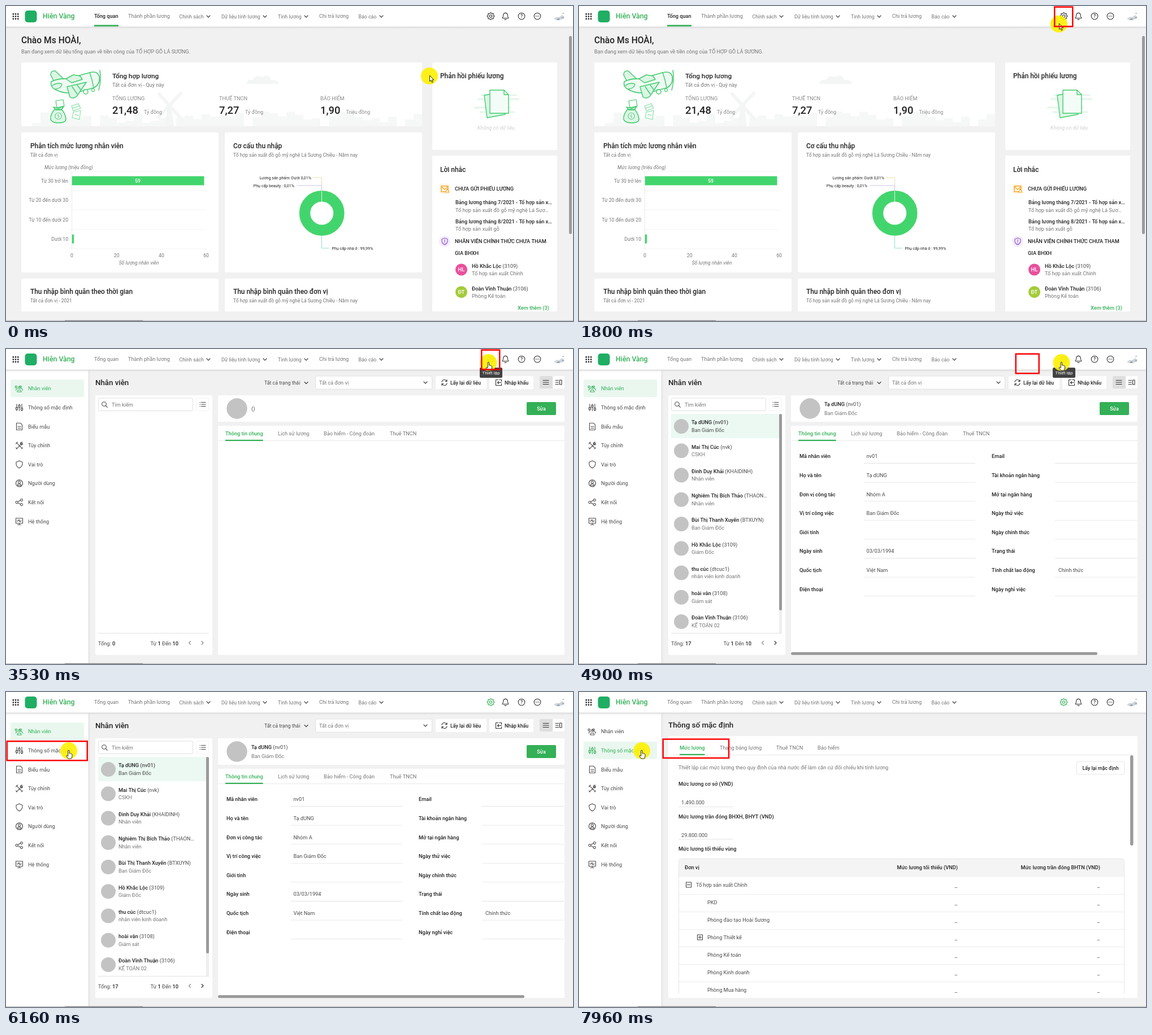
Animation, 1003 px wide and 558 px high, one loop 8000 ms. Source, as an HTML page with a canvas:

```html
<!DOCTYPE html>
<html lang="vi">
<head>
<meta charset="utf-8">
<style>
html, body { margin: 0; width: 100%; height: 100%; overflow: hidden; background: #f1f1f1; }
canvas { display: block; width: 1003px; height: 558px; }
</style>
</head>
<body>
<canvas id="stage"></canvas>
<script>
const W = 1003, H = 558, LOOP = 8000;
const canvas = document.getElementById('stage');
const dpr = window.devicePixelRatio || 1;
canvas.width = W * dpr;
canvas.height = H * dpr;
const c = canvas.getContext('2d');

const INK = '#212121', SOFT = '#4a4a4a', MUTE = '#757575', GREEN = '#34b057', LINE = '#e3e3e8', GREY = '#c3c3c3', THUMB = '#9b9b9b';
const COMPANY = 'Tổ hợp sản xuất đồ gỗ mỹ nghệ Lá Sương Chiều';

// ---- helpers ----
const clamp = v => Math.min(1, Math.max(0, v));
const prog = (t, from, to) => clamp((t - from) / (to - from));
const sine = p => (1 - Math.cos(Math.PI * p)) / 2;
const mix = (a, b, p) => a + (b - a) * p;

// Text centred vertically on y; returns the x where it ends.
function text(s, x, y, size = 9.2, color = SOFT, weight = 400, align = 'left') {
  c.font = `${weight} ${size}px Roboto, sans-serif`;
  c.fillStyle = color;
  c.textAlign = align;
  c.fillText(s, x, y + size * 0.36);
  return x + c.measureText(s).width;
}
const bold = (s, x, y, size = 9.2, color = INK, align) => text(s, x, y, size, color, 500, align);

function box(x, y, w, h, fill, r = 0, border) {
  c.beginPath();
  c.roundRect(x, y, w, h, r);
  if (fill) { c.fillStyle = fill; c.fill(); }
  if (border) { c.strokeStyle = border; c.lineWidth = 0.8; c.stroke(); }
}
const card = (x, y, w, h) => box(x, y, w, h, '#fff', 2);

function disc(x, y, r, fill, stroke, lw = 1.1) {
  c.beginPath();
  c.arc(x, y, r, 0, 7);
  if (fill) { c.fillStyle = fill; c.fill(); }
  if (stroke) { c.strokeStyle = stroke; c.lineWidth = lw; c.stroke(); }
}

function path(d, x, y, stroke, lw = 1.1, fill) {
  const p = new Path2D(d);
  c.save();
  c.translate(x, y);
  c.lineJoin = c.lineCap = 'round';
  if (fill) { c.fillStyle = fill; c.fill(p); }
  if (stroke) { c.strokeStyle = stroke; c.lineWidth = lw; c.stroke(p); }
  c.restore();
}
const hline = (x1, x2, y, color = LINE, h = 0.8) => box(x1, y - h / 2, x2 - x1, h, color);
const chevron = (x, y, color = '#444') => path('M-3-1.5L0 1.5 3-1.5', x, y, color, 1.2);

function clipped(x, y, w, h, draw) {
  c.save();
  c.beginPath();
  c.rect(x, y, w, h);
  c.clip();
  draw();
  c.restore();
}

function gear(x, y, color) {
  c.beginPath();
  for (let i = 0; i < 32; i++) {
    const a = (i - 0.5) / 32 * Math.PI * 2, r = i % 4 < 2 ? 6.3 : 4.9;
    c.lineTo(x + r * Math.cos(a), y + r * Math.sin(a));
  }
  c.closePath();
  c.strokeStyle = color;
  c.lineWidth = 1.1;
  c.stroke();
  disc(x, y, 2.2, null, color);
}

// ---- shared chrome ----
function header(home, gearColor) {
  const shade = c.createLinearGradient(0, 36, 0, 41);
  shade.addColorStop(0, '#d2d2d2');
  shade.addColorStop(1, 'rgba(225,225,225,0)');
  c.fillStyle = shade;
  c.fillRect(0, 36, W, 5);
  box(0, 0, W, 36.5, '#fff');
  for (let i = 0; i < 9; i++) box(11.6 + i % 3 * 4.2, 13 + (i / 3 | 0) * 4.2, 2.5, 2.5, '#222', 0.6);
  box(33.5, 8, 21, 21, '#1fae63', 5);
  bold('Hiên Vàng', 65, 18, 12.3, GREEN);
  if (home) {
    bold('Tổng quan', 156, 18, 9.1);
    box(156, 33.6, 43, 2.6, GREEN);
  } else text('Tổng quan', 156, 18, 9.2, MUTE);
  text('Thành phần lương', 216, 18, 9.2, MUTE);
  text('Chi trả lương', 554, 18, 9.2, MUTE);
  [['Chính sách', 306.5, 358], ['Dữ liệu tính lương', 381, 458], ['Tính lương', 481, 531], ['Báo cáo', 623.5, 664]]
    .forEach(([s, x, cx]) => { text(s, x, 19, 8.8, MUTE); chevron(cx, 18.5); });
  gear(857.5, 18, gearColor);
  path('M-5.5 3.5Q-3.8 1.5-3.8-1.5C-3.8-7 3.8-7 3.8-1.5Q3.8 1.5 5.5 3.5ZM-1.5 5.5Q0 7 1.5 5.5', 883.5, 18, '#333');
  disc(912, 18, 5.8, null, '#333');
  bold('?', 912, 18.2, 8.5, '#333', 'center');
  disc(940, 18, 5.8, null, '#333');
  for (const dx of [-2.6, 0, 2.6]) disc(940 + dx, 18, 0.8, '#333');
  path('M-9 3Q-5-2 0 0L6-4 10 0 5 4-2 5Z', 978, 20, null, 0, '#cfd6db');
  path('M-5 4L0 0 2 4ZM5-1L9-2 8 2Z', 978, 21, null, 0, '#9aa7b1');
  disc(985.5, 13, 1, '#8b97a0');
}

function footerLine() {
  hline(0, W, 557.4, '#c4c4c4', 1.2);
  hline(104, 242, 557.4, '#858585', 1.2);
}

// ---- dashboard ----
function skyline() {
  c.fillStyle = '#f5f8f6';
  for (let i = 0; i < 46; i++) {
    const n = Math.abs(Math.sin(i * 12.9898) * 43758.5453) % 1;
    if (i % 9 === 7) continue;
    c.fillRect(46 + i * 15, 213 - 6 - n * 20, 15, 6 + n * 20);
  }
  path('M-3 0H3L8 37H-8Z', 289, 176, null, 0, '#f3f6f4');
  path('M-18-20L22 25M20-21L-20 21', 289, 176, '#f3f6f4', 6);
  path('M0 14Q2 5 12 7 18-4 28 2 40-6 44 7 56 6 58 14Z', 425, 124, null, 0, '#f3f6f4');
}

function plane() {
  const g = '#43cc70', pale = '#dcf6e5';
  path('M84 132L79 122Q79 114 87 115L103 130Z', 0, 0, g, 1.5, pale);
  path('M80 134Q92 128 108 129L148 118Q162 114 165 125 167 139 155 145L126 153Q100 157 84 146 78 141 80 134Z', 0, 0, g, 1.6, '#eefaf2');
  path('M106 129L119 122 131 124 135 130 116 136ZM148 118Q153 131 155 145M108 143L142 135 126 159Q119 166 113 161Z', 0, 0, g, 1.5, pale);
  path('M82 141Q90 135 99 138 98 146 88 147', 0, 0, g, 1.3, pale);
  path('M166 114Q169 130 164 149M117 143L126 156M126 140L132 148M138 148L141 152', 0, 0, g, 1.5);
  disc(141, 152, 4, '#fff', g, 1.5);
  disc(154, 149, 2.5, '#fff', g, 1.2);
  path('M88 168L101 166 103 177 90 180Z', 0, 0, g, 1.2, '#fff');
  path('M86 183Q78 192 79 201 81 207 93 207 106 207 106 200 105 190 98 183ZM84 179L88 184 98 184 102 178 93 181Z', 0, 0, g, 1.6, pale);
  disc(92.5, 195, 5.5, '#fff', g, 1.2);
  bold('$', 92.5, 195, 8, g, 'center');
  path('M116 177L128 173 132 181 119 186ZM118 181L130 177M119 188L132 185 130 201 117 198ZM122 192L128 194', 0, 0, '#86dfa4', 1.1, '#f6fcf8');
}

function barChart() {
  bold('Phân tích mức lương nhân viên', 43, 247.5, 11.9);
  text('Tất cả đơn vị', 43, 263.5, 8.5, MUTE);
  text('Mức lương (triệu đồng)', 68, 286, 8.6, MUTE, 'italic 400');
  for (const y of [293, 327, 361, 396, 430]) hline(112, 354, y, '#f3f3f3');
  box(116, 293, 0.8, 137, '#e6e6e6');
  ['Từ 30 trở lên', 'Từ 20 đến dưới 30', 'Từ 10 đến dưới 20', 'Dưới 10']
    .forEach((s, i) => text(s, 110, 310 + i * 34.4, 8.6, MUTE, 400, 'right'));
  box(116.7, 301.6, 233.8, 15.8, '#43d56d');
  box(116.7, 404.8, 3.5, 15.8, '#43d56d');
  bold('59', 233, 310, 8.5, '#fff', 'center');
  [0, 20, 40, 60].forEach((n, i) => text(n, 116.5 + i * 79.2, 441.5, 8.6, MUTE, 400, 'center'));
  text('Số lượng nhân viên', 235, 455, 8.6, MUTE, 'italic 400', 'center');
}

function donut() {
  bold('Cơ cấu thu nhập', 402, 247.5, 11.9);
  text(COMPANY + ' - Năm nay', 402, 263.5, 8.5, MUTE);
  disc(558.7, 367, 30.2, null, '#43d56d', 19.4);
  box(558, 327, 1, 20, '#dff5e6');
  path('M558.5 327V304H543', 0, 0, '#ecd9a0', 0.9);
  path('M558.5 327V318H515', 0, 0, '#c6bbe8', 0.9);
  path('M558.5 407V429H571', 0, 0, '#84dcc4', 0.9);
  text('Lương sản phẩm: Dưới 0,01%', 540, 304, 7.1, INK, 400, 'right');
  text('Phụ cấp beauty : 0,01%', 510, 318, 7.1, INK, 400, 'right');
  text('Phụ cấp nhà ở : 99,99%', 576.5, 429, 7.1, INK);
}

function reminders() {
  bold('Lời nhắc', 768, 289.5, 11.9);
  box(767, 315, 18, 18, '#fff6e8', 4);
  path('M-6-5H6V5H-6ZM-6-4L0 1 6-4', 776, 324, '#f5a623', 1.4);
  path('M1 6L4.5 0 8 6Z', 776, 324, '#f5a623', 1.2, '#fff6e8');
  bold('CHƯA GỬI PHIẾU LƯƠNG', 794, 324);
  [7, 8].forEach((m, i) => bold(`Bảng lương tháng ${m}/2021 - Tổ hợp sản x…`, 795, 348 + i * 33.5));
  text('Tổ hợp sản xuất đồ gỗ mỹ nghệ Lá Sươ…', 795, 361.5, 9.2, MUTE);
  text('Tổ hợp sản xuất gỗ', 795, 395, 9.2, MUTE);
  disc(776, 417, 10, '#f3edfb');
  path('M0-6L5-4V0Q4 4 0 6-4 4-5 0V-4ZM0-3V1M0 3V3.2', 776, 417, '#9357d6', 1.2);
  bold('NHÂN VIÊN CHÍNH THỨC CHƯA THAM', 794, 417);
  bold('GIA BHXH', 794, 437.5);
  [['HL', 'Hồ Khắc Lộc', '3109', 'Tổ hợp sản xuất Chính', '#e9509d'], ['ĐT', 'Đoàn Vĩnh Thuận', '3106', 'Phòng Kế toán', '#a4cb3a']]
    .forEach(([tag, name, id, dept, color], i) => {
      const y = i * 39.7;
      disc(805.5, 467 + y, 10.5, color);
      bold(tag, 805.5, 467 + y, 9.6, '#fff', 'center');
      text(` (${id})`, bold(name, 824, 460.5 + y), 460.5 + y);
      text(dept, 824, 474 + y, 9.2, MUTE);
    });
  bold('Xem thêm (3)', 905, 535, 9.2, GREEN);
}

function dashboard() {
  bold('Chào Ms HOÀI,', 27, 60.5, 15.6);
  text('Bạn đang xem dữ liệu tổng quan về tiền công của TỔ HỢP GỖ LÁ SƯƠNG.', 27, 80.5, 9.2, MUTE);
  card(27, 100, 709, 113);
  for (const x of [27, 387]) {
    card(x, 224, 349, 248);
    card(x, 483, 349, 58);
  }
  card(754, 100, 221, 155);
  card(754, 265, 221, 276);
  box(996, 53, 5, 351, THUMB, 2.5);

  skyline();
  plane();
  bold('Tổng hợp lương', 188, 124, 11.8);
  text('Tất cả đơn vị - Quý này', 188, 140, 9.2, MUTE);
  [['TỔNG LƯƠNG', '21,48', 'Tỷ đồng', 188, 244], ['THUẾ TNCN', '7,27', 'Tỷ đồng', 377, 423], ['BẢO HIỂM', '1,90', 'Triệu đồng', 556, 601.5]]
    .forEach(([label, n, unit, x, ux]) => {
      text(label, x, 163.5, 9.2, '#8a8a8a');
      bold(n, x, 184.3, 18.4);
      text(unit, ux, 187.8, 9, '#8a8a8a');
    });

  barChart();
  donut();
  bold('Thu nhập bình quân theo thời gian', 43, 506, 11.9);
  text('Tất cả đơn vị - 2021', 43, 521.5, 8.5, MUTE);
  bold('Thu nhập bình quân theo đơn vị', 402, 506, 11.9);
  text(COMPANY + ' - Năm nay', 402, 521.5, 8.5, MUTE);

  bold('Phản hồi phiếu lương', 768, 124, 11.9);
  for (const [x1, x2, y] of [[840, 904, 158], [834, 908, 165], [828, 893, 180], [838, 900, 188]]) hline(x1, x2, y, '#e3f6e9', 3);
  path('M-15-16L10-20 22 18-10 24Z', 861, 174, '#43cc70', 1.4, '#dcf6e5');
  path('M-16-21H9L17-13V20H-16ZM9-21V-13H17', 872, 170, '#43cc70', 1.4, '#f4fcf7');
  text('Không có dữ liệu', 867, 216, 9.2, '#cfcfcf', 'italic 400', 'center');
  reminders();
}

// ---- settings ----
const MENU = [
  ['Nhân viên', 'M-4-3A1.7 1.7 0 1 1-4-3.1M4-3A1.7 1.7 0 1 1 4-3.1M0 0A1.8 1.8 0 1 1 .1 0M-6 3Q-6 0-3 0M6 3Q6 0 3 0M-3.5 6Q-3.5 2.5 0 2.5 3.5 2.5 3.5 6Z'],
  ['Thông số mặc định', 'M-4.5-6V0M-4.5 3.5V6M0-6V-4M0-.5V6M4.5-6V1M4.5 4.5V6M-6 0H-3V3.5H-6ZM-1.5-4H1.5V-.5H-1.5ZM3 1H6V4.5H3Z'],
  ['Biểu mẫu', 'M-5-6H2L5-3V6H-5ZM-2.5 0H2.5M-2.5 3H2.5'],
  ['Tùy chỉnh', 'M-5-5L5 5M-6-3L-3-6M6 4L4 6M-5 6L1 0M2-1Q1-5 5-6L3-3 4-2 6-4Q6 0 2-1M-6 4L-4 6'],
  ['Vai trò', 'M0-6.5L5.5-4V0Q4.5 4.5 0 6.5-4.5 4.5-5.5 0V-4Z'],
  ['Người dùng', 'M6 0A6 6 0 1 1 6-.1M2-2A2 2 0 1 1 2-2.1M-3 4V2Q0 0 3 2V4Z'],
  ['Kết nối', 'M-2.5 0A2 2 0 1 1-2.5-.1M6-4A2 2 0 1 1 6-4.1M6 4A2 2 0 1 1 6 3.9M-2.5-1L2-3.5M-2.5 1L2 3.5'],
  ['Hệ thống', 'M-6-5.5H6V3.5H-6ZM-3 6H3M0 3.5V6M-4-.5H-2L-.5-3 1 1 2-.5H4']
];

function sidebar(active) {
  const shade = c.createLinearGradient(145, 0, 150, 0);
  shade.addColorStop(0, '#dedede');
  shade.addColorStop(1, 'rgba(230,230,230,0)');
  c.fillStyle = shade;
  c.fillRect(145, 37, 5, H);
  box(0, 37, 145.5, H - 37, '#fff');
  MENU.forEach(([s, d], i) => {
    const y = 70 + i * 33.6, color = i === active ? GREEN : SOFT;
    if (i === active) box(8, y - 15.8, 130, 31, '#e9f7ef', 3);
    path(d, 23.5, y, color);
    text(s, 39, y, 9.2, color);
  });
}

function toolbar() {
  bold('Nhân viên', 158, 59.5, 13.3);
  text('Tất cả trạng thái', 457, 60, 8.8);
  chevron(531, 60);
  box(547.5, 48, 206, 23, '#fff', 2, '#dcdcdc');
  text('Tất cả đơn vị', 554, 59.5, 9.2, MUTE);
  chevron(742, 59.5);
  card(760, 48, 90, 23);
  path('M-4.5-1A4.5 4.5 0 0 1 4-2.5M4.5-5V-2H1.5M4.5 1A4.5 4.5 0 0 1-4 2.5M-4.5 5V2H-1.5', 775.5, 59.5, '#333');
  bold('Lấy lại dữ liệu', 786, 60, 8.8);
  card(855, 48, 78, 23);
  path('M-1-5H-5V5H5V2M1-5H5V-2M5 0H-2M0-2L-2 0 0 2', 871.5, 59.5, '#333');
  bold('Nhập khẩu', 882, 60, 8.8);
  box(944, 48, 23, 22, '#dedede', 2);
  box(967, 48, 21, 22, '#fff', 2);
  path('M-5-3.5H5M-5 0H5M-5 3.5H5', 955, 59, '#333');
  path('M-5.5-3.5H0M-5.5 0H0M-5.5 3.5H0M2-4H5.5V4H2Z', 977.5, 59, '#333');
}

const STAFF = [
  ['Tạ dUNG', 'nv01', 'Ban Giám Đốc'], ['Mai Thị Cúc', 'nvk', 'CSKH'],
  ['Đinh Duy Khải', 'KHAIDINH', 'Nhân viên'], ['Nghiêm Thị Bích Thảo', 'THAON…', 'Nhân viên'],
  ['Bùi Thị Thanh Xuyến', 'BTXUYN', 'Ban Giám Đốc'], ['Hồ Khắc Lộc', '3109', 'Giám Đốc'],
  ['thu cúc', 'dtcuc1', 'nhân viên kinh doanh'], ['hoài vân', '3108', 'Giám sát'],
  ['Đoàn Vĩnh Thuận', '3106', 'KẾ TOÁN 02']
];

function staffList(loaded) {
  card(158, 82, 207, 460);
  box(163.5, 87, 167, 22.5, '#fff', 2, '#d8d8d8');
  disc(173.5, 97.5, 3.8, null, '#444');
  path('M0 0L3 3', 176.3, 100.3, '#444');
  text('Tìm kiếm', 187, 98.5, 9.2, MUTE);
  box(336.5, 87, 22, 22.5, '#fff', 2, '#efefef');
  path('M-5-3.5H-4.5M-5 0H-4.5M-5 3.5H-4.5M-2.5-3.5H5M-2.5 0H5M-2.5 3.5H5', 348, 98, '#444');
  if (loaded) clipped(158, 115, 202, 388, () => {
    box(163, 115, 191, 43, '#ebf9f2');
    STAFF.forEach(([name, id, role], i) => {
      const y = i * 43.25;
      disc(181, 137 + y, 13, GREY);
      const end = bold(name, 199, 130 + y);
      text(id.endsWith('…') ? ` (${id}` : ` (${id})`, end, 130 + y, 9.2, SOFT, i ? 400 : 500);
      text(role, 199, 143.5 + y, 9.2, i ? MUTE : SOFT);
    });
    box(354, 115, 5, 388, '#efefef');
    box(354, 115, 5, 348, THUMB, 2.5);
  });
  hline(163, 359, 503.4, '#d9d9d9');
  bold(loaded ? '17' : '0', text('Tổng: ', 163, 521.5, 9.2), 521.5);
  let x = text('Từ ', 255.5, 521.5);
  x = bold('1', x, 521.5);
  x = text(' Đến ', x, 521.5);
  bold('10', x, 521.5);
  path('M1.5-3L-1.5 0 1.5 3', 325, 520.5, '#888');
  path('M-1.5-3L1.5 0-1.5 3', 347.5, 520.5, loaded ? '#333' : '#888');
}

function tabs(list, y, bottom, end) {
  hline(list[0][1] - 12, end, bottom - 0.5, '#e9e9e9');
  list.forEach(([s, x], i) => i ? text(s, x, y, 9.2, MUTE) : box(x, bottom - 2.2, bold(s, x, y, 9.2, GREEN) - x, 2.2, GREEN));
}

function staffDetail(loaded) {
  card(375, 82, 613, 47);
  disc(408.5, 105.5, 18.2, GREY);
  if (loaded) {
    text(' (nv01)', bold('Tạ dUNG', 434, 97.5), 97.5);
    text('Ban Giám Đốc', 434, 113.5, 9.2, MUTE);
  } else text('()', 434, 105.5);
  box(921, 94, 52, 23, GREEN, 2);
  bold('Sửa', 947, 105.8, 8.8, '#fff', 'center');
  card(375, 136, 613, 406);
  tabs([['Thông tin chung', 388], ['Lịch sử lương', 481], ['Bảo hiểm - Công đoàn', 562], ['Thuế TNCN', 679]], 149.5, 163, 988);
  if (!loaded) return;
  const left = [['Mã nhân viên', 'nv01'], ['Họ và tên', 'Tạ dUNG'], ['Đơn vị công tác', 'Nhóm A'], ['Vị trí công việc', 'Ban Giám Đốc'],
    ['Giới tính', ''], ['Ngày sinh', '03/03/1994'], ['Quốc tịch', 'Việt Nam'], ['Điện thoại', '']];
  const right = ['Email', 'Tài khoản ngân hàng', 'Mở tại ngân hàng', 'Ngày thử việc', 'Ngày chính thức', 'Trạng thái', 'Tính chất lao động', 'Ngày nghỉ việc'];
  left.forEach(([label, value], i) => {
    const y = 190 + i * 33.6;
    bold(label, 390, y);
    text(value, 508.5, y);
    hline(504, 701, y + 12.5);
    bold(right[i], 730, y);
    hline(842, 987, y + 12.5);
  });
  text('Chính thức', 848, 392);
  box(375, 537, 542, 5, THUMB, 2.5);
}

function spinner(t) {
  const p = prog(t, 7245, 7900);
  if (!p) return;
  c.beginPath();
  c.arc(573, 329.5, 11.5, 0, 0.02 + sine(p) * 4.7);
  c.strokeStyle = '#3b82f6';
  c.lineWidth = 2.4;
  c.lineCap = 'round';
  c.stroke();
  c.lineCap = 'butt';
}

function wageTable() {
  clipped(170, 290, 800, 245, () => {
    box(176.5, 295.5, 788, 280, '#fff', 4, '#e0e0e0');
    box(177, 296, 787, 31.5, '#f4f4f4', [4, 4, 0, 0]);
    bold('Đơn vị', 187, 311);
    bold('Mức lương tối thiểu (VND)', 670, 311, 9.2, INK, 'right');
    bold('Mức lương trần đóng BHTN (VND)', 922, 311, 9.2, INK, 'right');
    ['Tổ hợp sản xuất Chính', 'PKD', 'Phòng đào tạo Hoài Sương', 'Phòng Thiết kế', 'Phòng Kế toán', 'Phòng Kinh doanh', 'Phòng Mua hàng']
      .forEach((s, i) => {
        const y = 341.5 + i * 31;
        text(s, i ? 227 : 207, y);
        text('–', 670, y + 5.5, 9.2, SOFT, 400, 'right');
        text('–', 922, y + 5.5, 9.2, SOFT, 400, 'right');
        hline(177, 964, y + 17, '#ececec');
      });
    const sq = 'M-4.5-4.5H4.5V4.5H-4.5ZM-2.5 0H2.5';
    path(sq, 194, 341.5, '#444');
    path(sq + 'M0-2.5V2.5', 214, 434.5, '#444');
  });
  box(975, 112, 5.5, 160, THUMB, 2.7);
}

function defaults(t) {
  bold('Thông số mặc định', 158, 58, 13.4);
  card(158, 78, 830, 464);
  if (t < 7130) return;
  const loaded = t >= 7600, shift = loaded ? -5 : 0;
  tabs([['Mức lương', 178], ['Thang bảng lương', 249], ['Thuế TNCN', 349], ['Bảo hiểm', 422]], 98.5, 112, loaded ? 975 : 981);
  text('Thiết lập các mức lương theo quy định của nhà nước để làm căn cứ đối chiếu khi tính lương', 176, 134, 9.2, MUTE);
  box(885.5 + shift, 123, 84, 23, '#fff', 2, '#e0e0e0');
  bold('Lấy lại mặc định', 927.5 + shift, 134.8, 8.8, INK, 'center');
  bold('Mức lương cơ sở (VND)', 176, 163);
  hline(176, 272, 203.4, '#dcdcdc');
  bold('Mức lương trần đóng BHXH, BHYT (VND)', 176, 220.5);
  hline(176, 272, 260.8, '#dcdcdc');
  bold('Mức lương tối thiểu vùng', 176, 278);
  if (loaded) {
    text('1.490.000', 181, 196);
    text('29.800.000', 181, 253.5);
    wageTable();
  } else {
    box(176.5, 295.5, 793, 65, '#fff', 4, '#dedede');
    spinner(t);
  }
}

function settings(t) {
  const onDefaults = t >= 6800;
  sidebar(onDefaults ? 1 : t >= 3460 ? 0 : -1);
  if (onDefaults) {
    if (t >= 6930) defaults(t);
    return;
  }
  toolbar();
  if (t >= 3460) {
    staffList(t >= 4460);
    staffDetail(t >= 4700);
  }
}

// ---- overlays ----
function tooltip(t) {
  c.globalAlpha = prog(t, 1960, 2100) * (1 - prog(t, 5560, 5714));
  box(838, 33, 40, 18, '#424242', 2);
  text('Thiết lập', 858, 42, 8, '#fff', 400, 'center');
  c.globalAlpha = 1;
}

function pointer(t) {
  let x, y;
  if (t < 5500) {
    x = mix(749, 853.5, sine(prog(t, 1100, 1910)));
    y = mix(124, 24, sine(prog(t, 1100, 1955)));
  } else {
    const rest = 1 - prog(t, 5500, 6160);
    x = mix(111, 853.5, rest ** 4.3);
    y = mix(104, 24, rest ** 3.55);
  }
  disc(x, y, 15, 'rgba(255,239,0,.9)');
  const hand = (t >= 1935 && t < 5530) || (t > 5600 && x < 138);
  if (hand) path('M-1.5 1Q-1.5-.8-.2-.8 1-.8 1 1V5L2.2 4.6 3.6 5.2 5 5.3 6 6.4V10L4.6 14H-1L-4.4 9.4Q-4.6 7.4-1.5 9.2Z', x, y, '#111', 0.9, '#fff');
  else path('M0 0V10L2.3 8 4 12 5.7 11.2 4 7.4H7Z', x + 0.5, y - 0.5, '#111', 0.9, '#fff');
}

const SPOTS = [[840, 0.5, 34.5, 37], [0.5, 86, 144.5, 36.5], [238, 80, 103, 35.5]];
function frame(t) {
  const second = t >= 7500;
  const p = sine(second ? prog(t, 7500, 8300) : prog(t, 4754, 5551));
  const from = SPOTS[second ? 1 : 0], to = SPOTS[second ? 2 : 1];
  const [x, y, w, h] = from.map((v, i) => mix(v, to[i], p));
  c.globalAlpha = prog(t, 0, 765);
  c.strokeStyle = '#ff0000';
  c.lineWidth = 2.5;
  c.strokeRect(x + 1.25, y + 1.25, w - 2.5, h - 2.5);
  c.globalAlpha = 1;
}

function draw(t) {
  c.setTransform(dpr, 0, 0, dpr, 0, 0);
  box(0, 0, W, H, '#f1f1f1');
  if (t < 2400) dashboard();
  else if (t >= 2860) settings(t);
  header(t < 2400, t >= 1960 ? GREEN : '#333');
  footerLine();
  tooltip(t);
  pointer(t);
  frame(t);
}

function tick() {
  draw(performance.now() % LOOP);
  requestAnimationFrame(tick);
}
tick();
</script>
</body>
</html>
```
